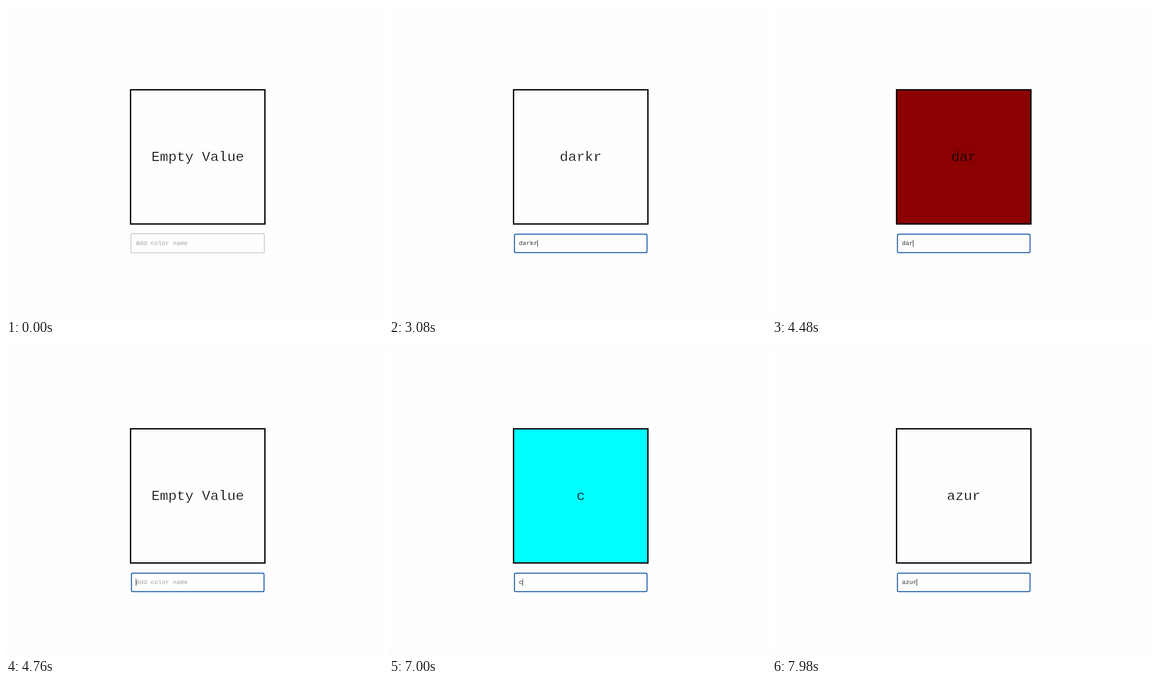
An HTML page with a canvas that plays this animation: 816 by 674 pixels, repeating every 8000 ms.

```html
<!DOCTYPE html>
<html lang="en">
<head>
<meta charset="utf-8">
<title>Color name</title>
<style>
  html, body { margin: 0; width: 100%; height: 100%; overflow: hidden; background: #fefefe; }
  canvas { display: block; }
</style>
</head>
<body>
<canvas id="stage" width="816" height="674"></canvas>
<script>
const ctx = document.getElementById('stage').getContext('2d');
const LOOP = 8000;
const FOCUS_AT = 980;
const PAGE = '#fefefe';
const FILLS = { '': PAGE, darkred: '#8b0000', cyan: '#00ffff' };
const FAMILY = '"Courier New", "Liberation Mono", monospace';

// [start in ms, typed value, caret visible]
const STEPS = [
  [0, '', false], [980, '', true], [1470, '', false],
  [1610, 'd', true], [2100, 'da', true], [2520, 'dar', true], [2660, 'dark', true],
  [3080, 'darkr', true], [3220, 'darkre', true], [3360, 'darkred', true],
  [3780, 'darkre', true], [3920, 'darkre', false],
  [4340, 'darkr', true], [4410, 'dark', true], [4480, 'dar', true], [4550, 'da', true],
  [4690, 'd', true], [4760, '', true],
  [4900, 'c', true], [5180, 'cy', true], [5390, 'cya', true], [5600, 'cyan', true],
  [6160, 'cyan', false], [6370, 'cya', false], [6650, 'cya', true],
  [6860, 'cy', true], [7000, 'c', true], [7140, '', true],
  [7420, 'a', true], [7630, 'az', true], [7770, 'azu', true], [7980, 'azur', true]
];

// An unknown color name leaves the previous fill in place.
function stateAt(time) {
  const state = { value: '', caret: false, fill: PAGE, focused: time >= FOCUS_AT };
  for (const [start, value, caret] of STEPS) {
    if (start > time) break;
    state.value = value;
    state.caret = caret;
    state.fill = FILLS[value] || state.fill;
  }
  return state;
}

function drawCorners() {
  ctx.fillStyle = '#8c8c8c';
  for (const x of [0, 815]) {
    for (const y of [0, 673]) ctx.fillRect(x, y, 1, 1);
  }
}

function drawSquare({ value, fill }) {
  ctx.fillStyle = fill;
  ctx.fillRect(271, 183, 288, 288);
  ctx.strokeStyle = '#000';
  ctx.lineWidth = 2.85;
  ctx.strokeRect(269.6, 181.6, 290.8, 290.8);

  const label = value || 'Empty Value';
  ctx.font = `30.4px ${FAMILY}`;
  ctx.textAlign = 'center';
  ctx.fillStyle = '#000';
  ctx.fillText(label, 415, 336);
  // Slim the stems with a hairline in the fill color.
  ctx.strokeStyle = fill;
  ctx.lineWidth = 0.6;
  ctx.strokeText(label, 415, 336);
}

function drawInput({ value, caret, focused }) {
  ctx.beginPath();
  if (focused) {
    ctx.roundRect(271.5, 494.5, 287, 40, 3);
    ctx.strokeStyle = '#0a4fa3';
    ctx.lineWidth = 2;
  } else {
    ctx.rect(270.5, 493.5, 288.5, 41.5);
    ctx.strokeStyle = '#a0a0a0';
    ctx.lineWidth = 1;
  }
  ctx.stroke();

  ctx.font = `13.33px ${FAMILY}`;
  ctx.textAlign = 'left';
  ctx.fillStyle = value ? '#333' : '#a2a2a2';
  ctx.fillText(value || 'Add color name', 281.3, 518);
  if (caret) {
    ctx.fillStyle = '#000';
    ctx.fillRect(281 + 8 * value.length, 507, 1, 15);
  }
}

function draw(now) {
  const state = stateAt(now % LOOP);
  ctx.fillStyle = PAGE;
  ctx.fillRect(0, 0, 816, 674);
  drawCorners();
  drawSquare(state);
  drawInput(state);
  requestAnimationFrame(draw);
}

draw(performance.now());
</script>
</body>
</html>
```
